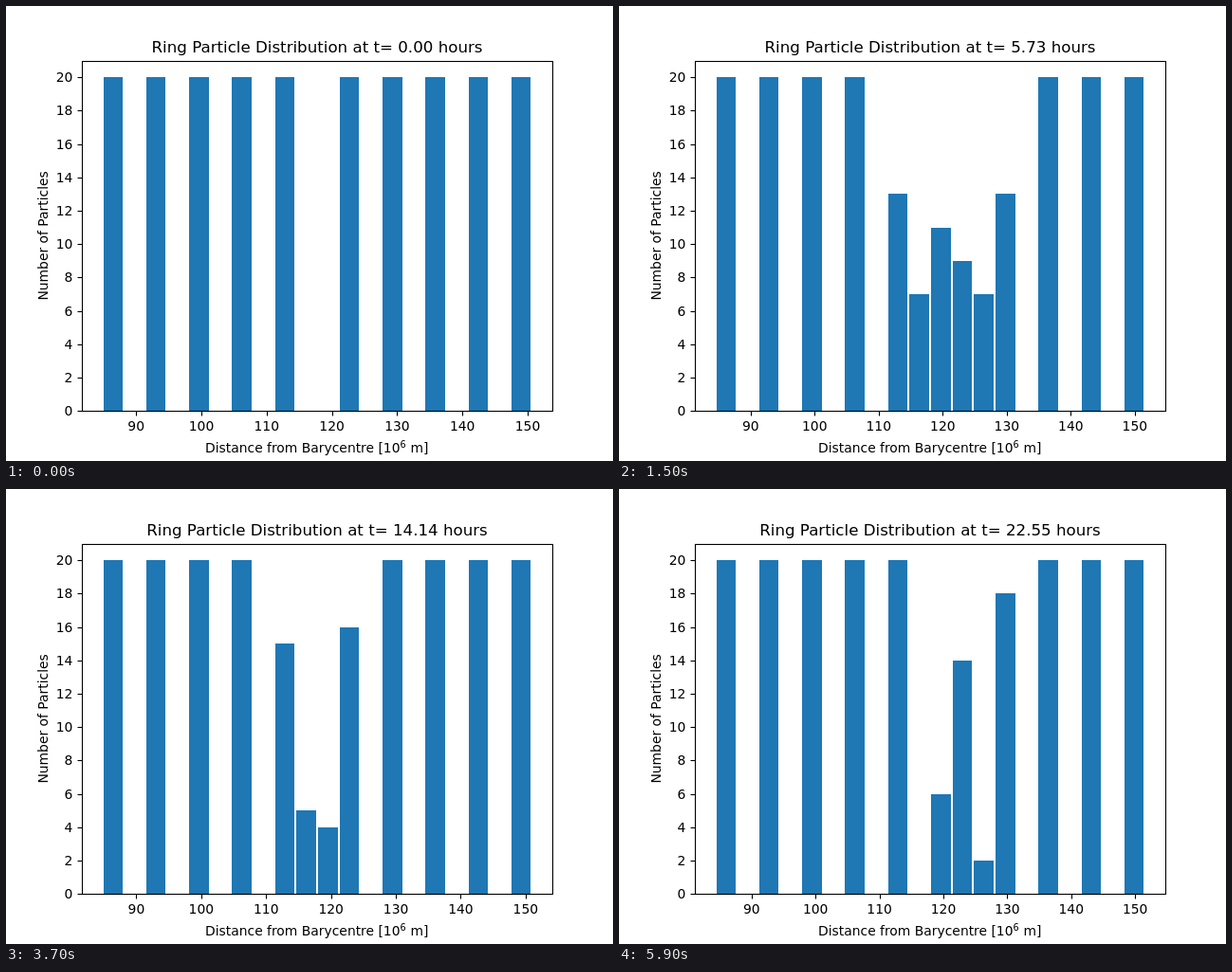
These frames come from a looping animation (640x480 px, 6000 ms). An HTML page with a canvas:

```html
<!DOCTYPE html>
<html lang="en">
<head>
<meta charset="utf-8">
<title>Ring Particle Distribution</title>
<style>
html, body { margin: 0; width: 100%; height: 100%; overflow: hidden; background: #fff; }
canvas { display: block; }
</style>
</head>
<body>
<canvas id="plot" width="640" height="480"></canvas>
<script>
const ctx = document.getElementById('plot').getContext('2d');

// Units: 10^6 m and hours
const FRAMES = 60, FRAME_MS = 100, HOURS_PER_FRAME = 0.382245;
const RINGS = 10, PER_RING = 20, BINS = 20;
const INNER = 84.8, OUTER = 150.67;
const GM = 491586;                        // planet's gravity
const OFFSET = 0.289;                     // planet to barycentre
const MOON_RATE = 2 * Math.PI / 382.7;
const FIRST_ANGLE = 227 * Math.PI / 180;  // measured from the moon's direction
const SUBSTEPS = 20;

// Plot area and the span of the bars, which leave 5% margins
const LEFT = 80, RIGHT = 576, TOP = 57.6, BOTTOM = 427.2;
const BARS_LEFT = LEFT + (RIGHT - LEFT) / 22;
const BIN_WIDTH = (RIGHT - LEFT) / 1.1 / (BINS - 0.1);
const UNIT = (BOTTOM - TOP) / 21;

// Positions and velocities are relative to the planet
function createParticles() {
  const particles = [];
  for (let i = 0; i < RINGS; i++) {
    const r = INNER + (OUTER - INNER) * i / (RINGS - 1);
    const speed = Math.sqrt(GM / r);
    for (let j = 0; j < PER_RING; j++) {
      const a = FIRST_ANGLE + 2 * Math.PI * j / (PER_RING - 1);
      particles.push({
        x: r * Math.cos(a) + OFFSET,
        y: r * Math.sin(a),
        vx: -speed * Math.sin(a),
        vy: speed * Math.cos(a) + OFFSET * MOON_RATE
      });
    }
  }
  return particles;
}

function advance(p, dt) {
  p.x += p.vx * dt / 2;
  p.y += p.vy * dt / 2;
  const pull = GM * dt / Math.hypot(p.x, p.y) ** 3;
  p.vx -= p.x * pull;
  p.vy -= p.y * pull;
  p.x += p.vx * dt / 2;
  p.y += p.vy * dt / 2;
}

function histogram(particles, hours) {
  const px = OFFSET * Math.cos(MOON_RATE * hours);
  const py = OFFSET * Math.sin(MOON_RATE * hours);
  const radii = particles.map(p => Math.hypot(p.x - px, p.y - py));
  const low = Math.min(...radii), high = Math.max(...radii);
  const counts = new Array(BINS).fill(0);
  for (const r of radii) {
    counts[Math.min(BINS - 1, Math.floor((r - low) / (high - low) * BINS))]++;
  }
  return { hours, low, high, counts };
}

function simulate() {
  const particles = createParticles(), history = [];
  for (let f = 0; f < FRAMES; f++) {
    history.push(histogram(particles, f * HOURS_PER_FRAME));
    for (const p of particles) {
      for (let s = 0; s < SUBSTEPS; s++) advance(p, HOURS_PER_FRAME / SUBSTEPS);
    }
  }
  return history;
}

function text(str, x, y, align = 'center', size = 13.889) {
  ctx.font = `${size}px "DejaVu Sans", sans-serif`;
  ctx.textAlign = align;
  ctx.fillText(str, x, y);
  return ctx.measureText(str).width;
}

function line(x1, y1, x2, y2) {
  ctx.beginPath();
  ctx.moveTo(x1, y1);
  ctx.lineTo(x2, y2);
  ctx.stroke();
}

function drawLabels(hours) {
  text(`Ring Particle Distribution at t= ${hours.toFixed(2)} hours`, 328, 49, 'center', 16.667);
  let x = 210;
  x += text('Distance from Barycentre [10', x, 471, 'left');
  x += text('6', x, 465.7, 'left', 9.722) + 0.4;
  text(' m]', x, 471, 'left');
  ctx.save();
  ctx.translate(44, 242.4);
  ctx.rotate(-Math.PI / 2);
  text('Number of Particles', 0, 0);
  ctx.restore();
}

function draw({ hours, low, high, counts }) {
  ctx.fillStyle = '#fff';
  ctx.fillRect(0, 0, 640, 480);

  ctx.fillStyle = '#1f77b4';
  counts.forEach((count, i) => {
    const x = BARS_LEFT + i * BIN_WIDTH;
    const x1 = Math.round(x), x2 = Math.round(x + 0.9 * BIN_WIDTH);
    const y = Math.round(BOTTOM - count * UNIT);
    ctx.fillRect(x1, y, x2 - x1, 427 - y);
  });

  ctx.fillStyle = ctx.strokeStyle = '#000';
  ctx.lineWidth = 1.11;
  ctx.strokeRect(80.5, 58.5, 496, 369);

  const firstEdge = BARS_LEFT - 0.05 * BIN_WIDTH;
  const scale = BINS * BIN_WIDTH / (high - low);
  for (let v = 90; v <= 150; v += 10) {
    const x = firstEdge + (v - low) * scale, tick = Math.round(x) + 0.5;
    line(tick, 427.5, tick, 432.5);
    text(v, x, 448);
  }
  for (let v = 0; v <= 20; v += 2) {
    const y = Math.round(BOTTOM - v * UNIT);
    line(75.5, y + 0.5, 80.5, y + 0.5);
    text(v, 70.3, y + 5, 'right');
  }
  drawLabels(hours);
}

const history60 = simulate();
const start = performance.now();

function animate() {
  const elapsed = performance.now() - start;
  draw(history60[Math.floor(elapsed / FRAME_MS) % FRAMES]);
  requestAnimationFrame(animate);
}
animate();
</script>
</body>
</html>
```
